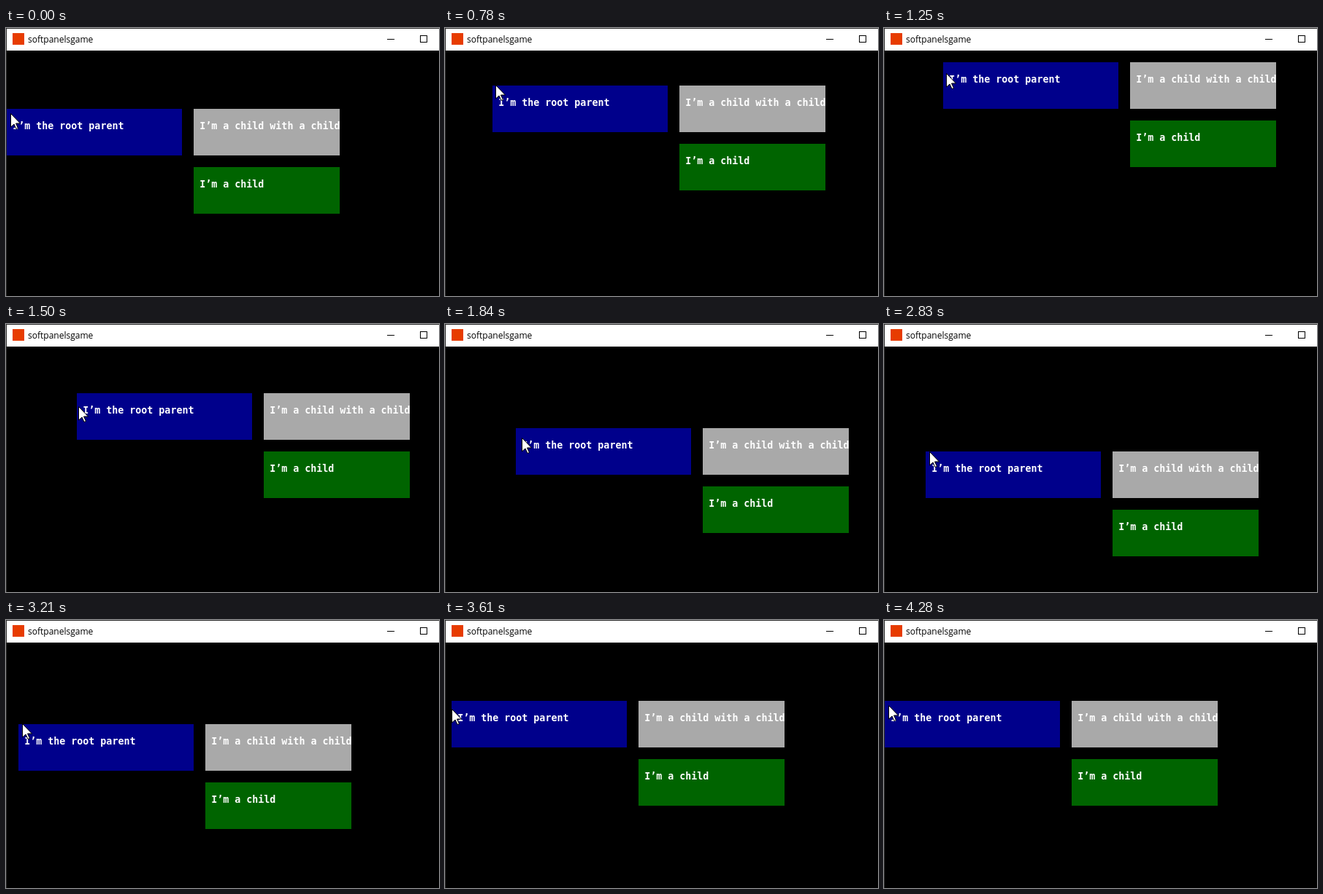
These frames come from a looping animation (593x368 px, 4530 ms). An HTML page:

```html
<!DOCTYPE html>
<html lang="en">
<head>
<meta charset="utf-8">
<title>softpanelsgame</title>
<style>
  html, body { margin: 0; width: 100%; height: 100%; overflow: hidden; background: #000; }
  svg { display: block; }
  rect { shape-rendering: crispEdges; }
  .console { font: bold 13.3px "DejaVu Sans Mono", monospace; fill: #fff; }
  .title { font: 12px "Open Sans", sans-serif; fill: #000; }
</style>
</head>
<body>
<svg width="593" height="368" viewBox="0 0 593 368">
  <rect width="593" height="368" fill="#2b2b2b"/>
  <rect x="1" y="1" width="592" height="30" fill="#fff"/>
  <rect x="1" y="31" width="592" height="337" fill="#000"/>
  <rect x="9" y="7" width="16" height="16" fill="#e73c00"/>
  <text class="title" x="30" y="20">softpanelsgame</text>
  <rect x="522" y="15" width="10" height="1" fill="#000"/>
  <rect x="567.5" y="10.5" width="9" height="9" fill="none" stroke="#000"/>

  <g id="panels" class="console">
    <rect width="240" height="64" fill="#00008b"/>
    <text x="8.3" y="28">I’m the root parent</text>
    <rect x="256" width="200" height="64" fill="#a9a9a9"/>
    <text x="264.3" y="28">I’m a child with a child</text>
    <rect x="256" y="80" width="200" height="64" fill="#006400"/>
    <text x="264.3" y="108">I’m a child</text>
  </g>

  <path id="pointer" fill="#fff" stroke="#000"
    d="M.5 -.5V18L5 14L8 20.5L10.5 19.5L7.5 13H13.5Z"/>
</svg>
<script>
const LOOP = 4530;
const LAG = 20; // the panels trail the pointer slightly
const CELL_WIDTH = 8, CELL_HEIGHT = 16;
const LEFT = 1, TOP = 31;

// Turning points of the drag
const route = [
  { time: 410, x: 6, y: 118 },
  { time: 780, x: 69, y: 79 },
  { time: 980, x: 84, y: 59 },
  { time: 1230, x: 84, y: 59 },
  { time: 1500, x: 98.5, y: 114 },
  { time: 2300, x: 114, y: 214 },
  { time: 2830, x: 62, y: 176 },
  { time: 3210, x: 22.5, y: 143 },
  { time: 3700, x: 6, y: 118 }
];

const panels = document.getElementById("panels");
const pointer = document.getElementById("pointer");

function pointerAt(time) {
  const next = route.findIndex(point => point.time > time);
  if (next <= 0) return route[0];
  const from = route[next - 1], to = route[next];
  const k = (time - from.time) / (to.time - from.time);
  return { x: from.x + (to.x - from.x) * k, y: from.y + (to.y - from.y) * k };
}

const snap = (value, origin, size) =>
  origin + Math.floor((value - origin) / size) * size;

const place = (element, x, y) =>
  element.setAttribute("transform", `translate(${x} ${y})`);

function draw() {
  const time = performance.now() % LOOP;
  const tip = pointerAt(time);
  const drag = pointerAt(time - LAG);
  place(pointer, Math.round(tip.x), Math.round(tip.y));
  place(panels, snap(drag.x, LEFT, CELL_WIDTH), snap(drag.y, TOP, CELL_HEIGHT));
  requestAnimationFrame(draw);
}
draw();
</script>
</body>
</html>
```
